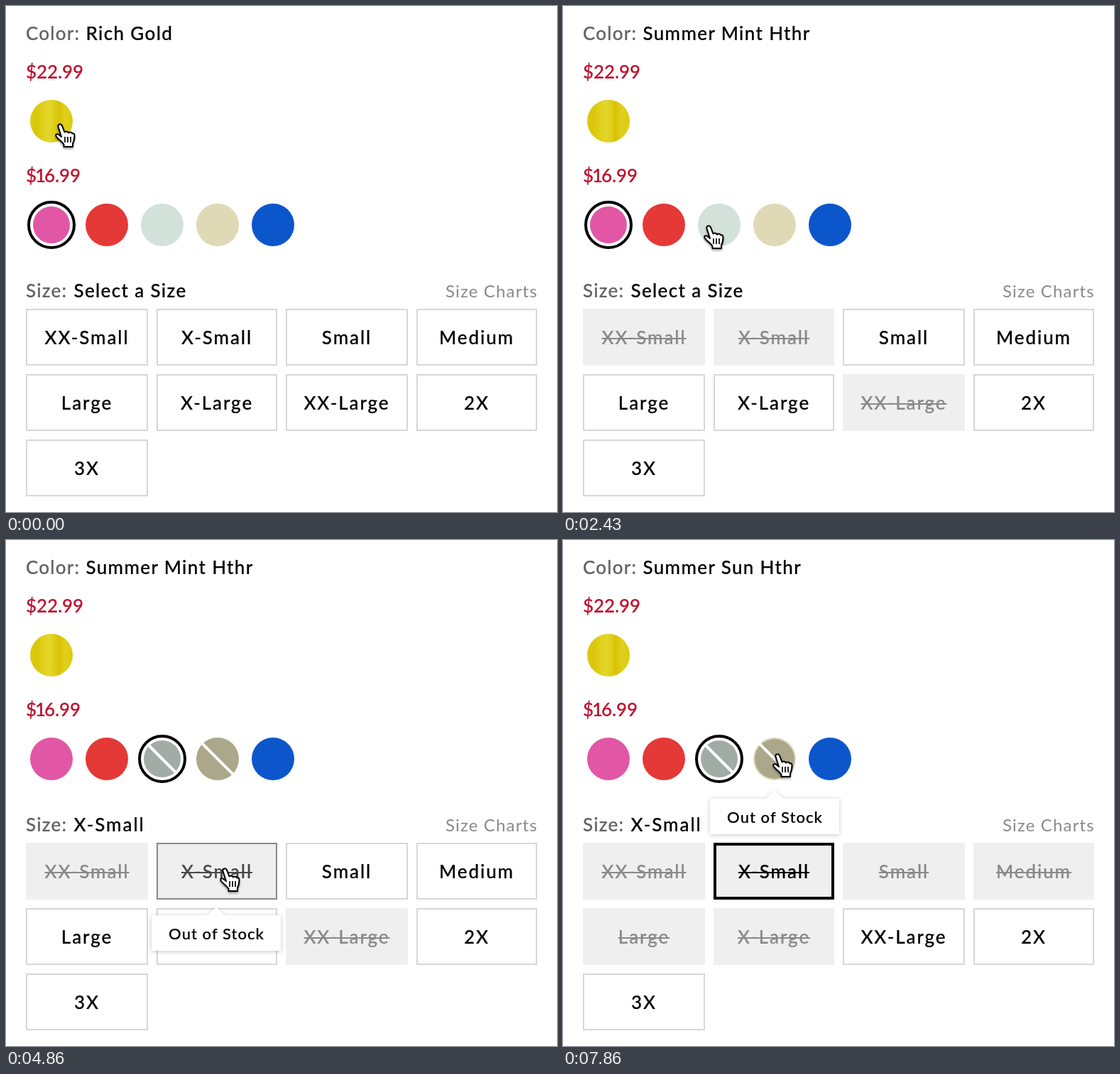
Recreate the animation shown at these times as an HTML page. Size 776 by 712 pixels, loop 8 s.

```html
<!DOCTYPE html>
<html lang="en">
<head>
<meta charset="utf-8">
<title>Color and size picker</title>
<style>
  html, body { margin: 0; width: 100%; height: 100%; overflow: hidden; background: #fff; }
  svg { display: block; width: 100vw; height: 100vh; }
  text { font: 500 26px Lato, "Open Sans", sans-serif; letter-spacing: 1.35px; fill: #000; stroke: #000; stroke-width: .2px; white-space: pre; }
  .label { letter-spacing: 1.2px; fill: #636363; stroke: #636363; }
  .price { font-weight: 600; letter-spacing: -.1px; fill: #be1431; stroke: none; }
  .link { font-size: 24px; font-weight: 400; letter-spacing: 1.15px; fill: #8a8a8a; stroke: none; }
  .size { letter-spacing: 1.9px; text-anchor: middle; }
  .tip { font-size: 22px; letter-spacing: 1.05px; text-anchor: middle; }
</style>
</head>
<body>
<svg id="stage" viewBox="0 0 776 712" xmlns="http://www.w3.org/2000/svg">
  <defs>
    <linearGradient id="gold">
      <stop offset="0" stop-color="#dccb0e"/><stop offset=".14" stop-color="#d9c60a"/>
      <stop offset=".32" stop-color="#e1d11e"/><stop offset=".46" stop-color="#e4d62a"/>
      <stop offset=".57" stop-color="#dfce18"/><stop offset=".67" stop-color="#d7c307"/>
      <stop offset=".82" stop-color="#e0d01a"/><stop offset="1" stop-color="#dccb10"/>
    </linearGradient>
    <filter id="soft" x="-20%" y="-30%" width="140%" height="170%">
      <feDropShadow dx="0" dy="1" stdDeviation="3" flood-opacity=".22"/>
    </filter>
    <filter id="drop" x="-50%" y="-50%" width="200%" height="200%">
      <feDropShadow dx="0" dy="2" stdDeviation="1.6" flood-opacity=".4"/>
    </filter>
  </defs>
</svg>
<script>
const LOOP = 8000;
const stage = document.getElementById('stage');

function add(tag, attrs, parent = stage) {
  const el = document.createElementNS('http://www.w3.org/2000/svg', tag);
  set(el, attrs);
  parent.appendChild(el);
  return el;
}
function set(el, attrs) {
  for (const k in attrs) el.setAttribute(k, attrs[k]);
}
function write(str, x, y, cls = '', parent = stage) {
  const el = add('text', { x, y, class: cls }, parent);
  el.textContent = str;
  return el;
}
const show = (el, on) => el.setAttribute('visibility', on ? 'visible' : 'hidden');

// Static labels
write('Color:', 28, 48, 'label');
write('$22.99', 28, 102, 'price');
// Kern the narrow 1
set(write('$16.99', 28, 248, 'price'), { dx: '0 -2 -2' });
write('Size:', 28, 410, 'label');
write('Size Charts', 619, 410, 'link');
const colorName = write('', 112.5, 48);
const sizeName = write('', 95.5, 410);

// Color swatches: out lists the sizes that are out of stock
const colors = {
  gold: { name: 'Rich Gold', fill: 'url(#gold)', x: 64, y: 162, out: [] },
  fuchsia: { name: 'Vivid Fuchsia', fill: '#e157a5', x: 64, y: 308, out: [6, 8] },
  coral: { name: 'Autumn Coral', fill: '#e43936', x: 142, y: 308, out: [6, 7, 8] },
  mint: { name: 'Summer Mint Hthr', fill: '#d2e1da', x: 220, y: 308, out: [0, 1, 6] },
  sun: { name: 'Summer Sun Hthr', fill: '#dfdab5', x: 298, y: 308, out: [0, 1, 2, 3, 4, 5] },
  blue: { name: 'Blue', fill: '#0c56cc', x: 376, y: 308, out: [] }
};
for (const c of Object.values(colors)) {
  const at = { cx: c.x, cy: c.y };
  c.disc = add('circle', { ...at, r: 30, fill: c.fill });
  c.shade = add('circle', { ...at, r: 30, fill: '#000', 'fill-opacity': .235 });
  c.slash = add('path', { stroke: '#fff', 'stroke-width': 4 });
  c.ring = add('circle', { ...at, r: 32, fill: 'none', stroke: '#000', 'stroke-width': 4 });
}

// Size buttons
const columns = [[28, 172], [212, 170], [394, 172], [578, 170]];
const sizes = ['XX-Small', 'X-Small', 'Small', 'Medium', 'Large', 'X-Large', 'XX-Large', '2X', '3X'].map((name, i) => {
  const [x, w] = columns[i % 4];
  const y = 426 + 92 * Math.floor(i / 4);
  const mid = x + w / 2;
  const box = add('rect', {});
  const text = write(name, mid, y + 50, 'size');
  const half = text.getComputedTextLength() / 2;
  const strike = add('rect', { x: mid - half, y: y + 41, width: half * 2, height: 2 });
  return { x, y, w, box, text, strike };
});

// Tooltip, placed by the point of its caret
const tip = add('g', {});
add('path', { d: 'M-91 11.500H-12L0 0L12 11.500H91V61.500H-91Z', fill: '#fff', filter: 'url(#soft)' }, tip);
write('Out of Stock', 0.5, 45.500, 'tip', tip);

// Pointers, each with its hot spot at 0,0
const pointer = add('g', {});
const pointers = { hand: add('g', {}, pointer), arrow: add('g', {}, pointer), beam: add('g', {}, pointer) };
add('path', {
  d: 'M-3.500 2C-4.500 -2 0.500 -3 2 0.500L5.500 9.500C7.500 8 10 8.500 11 10.500C13 9 15.500 9.500 16.500 11.500C18.500 10.500 19.500 12.500 19.500 14.500C19.500 19.500 19 22 17 25.500V30H4.500V27C2 23 -3 20 -6 16C-8.500 12.500 -4.500 11 -2 13.500L1 16Z',
  fill: '#fff', stroke: '#000', 'stroke-width': 2, 'stroke-linejoin': 'round', filter: 'url(#drop)'
}, pointers.hand);
add('path', { d: 'M6 16V24M10 16V24M14 16V24', stroke: '#000', 'stroke-width': 1.7 }, pointers.hand);
add('path', {
  d: 'M0 0V25L5.500 20L9.500 30L14 28L10 18.500H17Z',
  fill: '#000', stroke: '#fff', 'stroke-width': 2.5, 'paint-order': 'stroke', filter: 'url(#drop)'
}, pointers.arrow);
const beam = 'M-6.500 -14.500Q0 -14.500 0 -9V9Q0 14.500 -6.500 14.500M6.500 -14.500Q0 -14.500 0 -9V9Q0 14.500 6.500 14.500M-3.500 1H3.500';
for (const [stroke, width] of [['#fff', 4], ['#000', 2]]) {
  add('path', { d: beam, fill: 'none', stroke, 'stroke-width': width }, pointers.beam);
}

// Pointer track: time, x, y, shape
const track = [
  [0, 77, 168, 'hand'], [140, 77, 173, 'hand'], [290, 75, 186, 'hand'], [430, 72, 205, 'arrow'],
  [570, 70, 227, 'beam'], [710, 68, 242, 'beam'], [860, 64, 266, 'arrow'], [1000, 60, 294, 'hand'],
  [1140, 58, 311, 'hand'], [1290, 57, 318, 'hand'], [1570, 78, 318, 'hand'], [1710, 138, 315, 'hand'],
  [1860, 147, 314, 'hand'], [2000, 164, 313, 'hand'], [2140, 182, 312, 'arrow'], [2290, 198, 311, 'hand'],
  [2430, 206, 311, 'hand'], [2570, 209, 312, 'hand'], [3000, 204, 315, 'hand'], [3430, 206, 319, 'hand'],
  [3570, 213, 329, 'hand'], [3710, 226, 348, 'arrow'], [3860, 243, 370, 'arrow'], [4000, 259, 392, 'arrow'],
  [4140, 275, 411, 'arrow'], [4290, 289, 424, 'arrow'], [4430, 302, 447, 'hand'], [4570, 307, 459, 'hand'],
  [4720, 309, 463, 'hand'], [4860, 309, 464, 'hand'], [6570, 381, 385, 'arrow'], [6710, 364, 368, 'arrow'],
  [6860, 344, 350, 'arrow'], [7000, 318, 326, 'hand'], [7150, 307, 312, 'hand'], [7290, 301, 305, 'hand'],
  [7860, 303, 303, 'hand']
];
const shownColor = [
  [0, 'gold'], [430, 'fuchsia'], [1710, 'coral'], [2140, 'fuchsia'], [2290, 'mint'], [7000, 'sun']
];
// Opacity and caret position
const tipTrack = [
  [0, 0, 0, 0], [4570, .5, 296, 516.500], [4720, 1, 296, 516.500], [6570, 0, 0, 0],
  [7150, .5, 298, 352.500], [7290, 1, 298, 352.500]
];
const latest = (list, t) => list.findLast(k => k[0] <= t);

function drawSize(s, out, hot, picked) {
  const ink = picked ? '#000' : hot ? '#484848' : out ? '#898989' : '#000';
  const edge = picked ? '#000' : hot ? '#898989' : out ? '#efefef' : '#d7d7d7';
  const line = picked ? 4 : 2;
  set(s.box, {
    x: s.x + line / 2, y: s.y + line / 2, width: s.w - line, height: 80 - line,
    fill: out ? '#efefef' : '#fff', stroke: edge, 'stroke-width': line
  });
  s.text.style.fill = s.text.style.stroke = ink;
  s.strike.setAttribute('fill', ink);
  show(s.strike, out);
}

function drawColor(c, chosen, out, hovered) {
  const r = chosen ? 26 : 30;
  const d = r * .73;
  set(c.disc, { r });
  set(c.shade, { r: hovered ? r - 2 : r });
  set(c.slash, { d: `M${c.x - d} ${c.y - d}L${c.x + d} ${c.y + d}` });
  show(c.ring, chosen);
  show(c.shade, out);
  show(c.slash, out);
}

function draw(t) {
  const key = latest(shownColor, t)[1];
  const chosen = t < 3290 ? 'fuchsia' : 'mint';
  const hot = t >= 4430;
  const picked = t >= 5710;

  colorName.textContent = colors[key].name;
  sizeName.textContent = hot ? 'X-Small' : 'Select a Size';
  sizeName.style.letterSpacing = hot ? '1.9px' : '';
  for (const k in colors) {
    const out = hot && (k === 'mint' || k === 'sun');
    drawColor(colors[k], k === chosen, out, k === 'sun' && key === 'sun');
  }
  sizes.forEach((s, i) => drawSize(s, colors[key].out.includes(i), hot && i === 1, picked && i === 1));

  const [, opacity, tx, ty] = latest(tipTrack, t);
  set(tip, { opacity, transform: `translate(${tx} ${ty})` });

  const [, x, y, shape] = latest(track, t);
  set(pointer, { transform: `translate(${x} ${y})` });
  for (const p in pointers) show(pointers[p], p === shape);
}

const start = performance.now();
function tick() {
  draw((performance.now() - start) % LOOP);
  requestAnimationFrame(tick);
}
tick();
</script>
</body>
</html>
```
